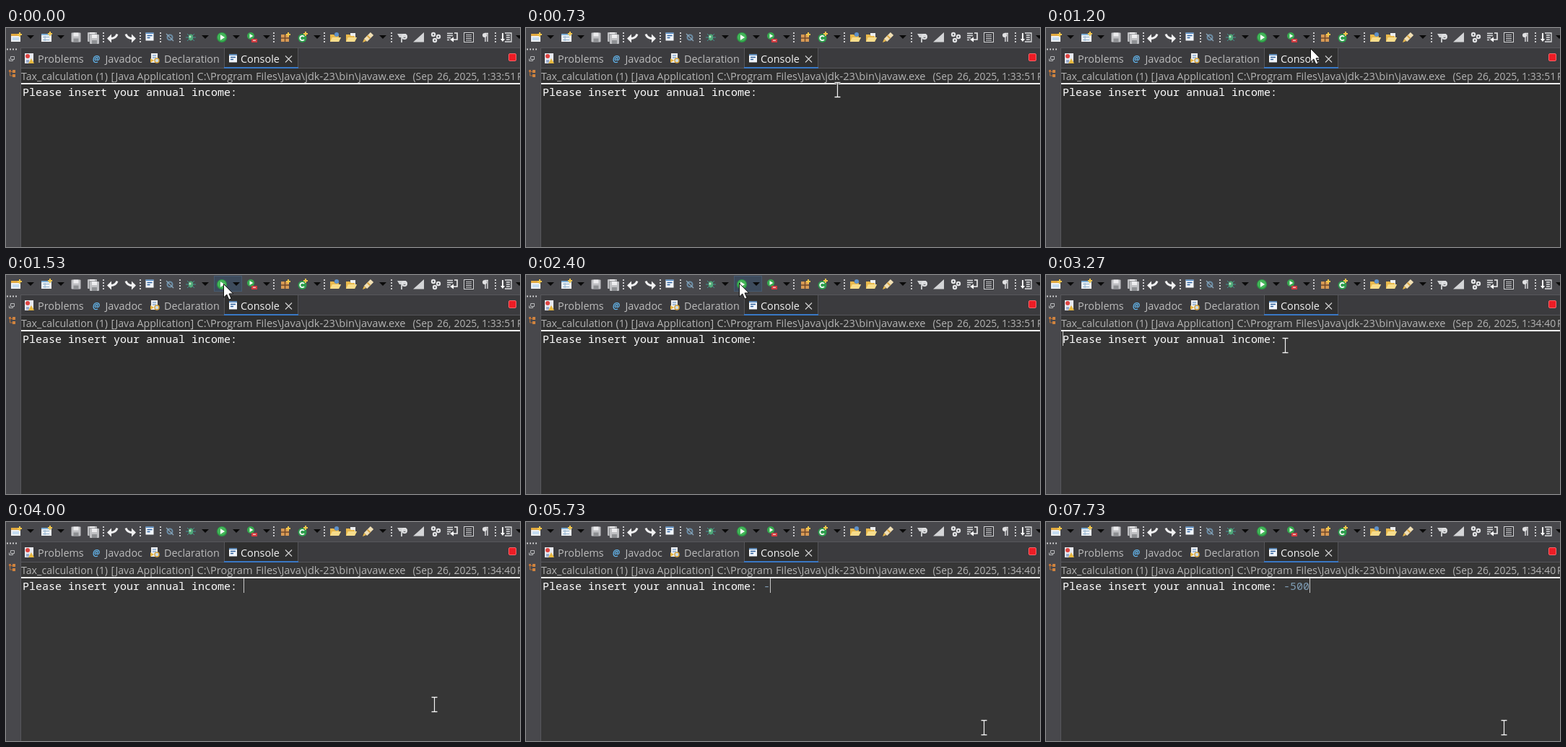
Write an HTML page that moves like this. It is 712x303 px and loops after 8 s.

```html
<!DOCTYPE html>
<html lang="en">
<head>
<meta charset="utf-8">
<title>Console input</title>
<style>
  html, body { margin: 0; width: 100%; height: 100%; overflow: hidden; background: #48484c; }
  svg { display: block; width: 712px; height: 303px; }
  text { white-space: pre; }
  .ui { font: 14.4px "Open Sans", "Noto Sans", sans-serif; fill: #bcbcbc; }
  .head { font-size: 14.2px; fill: #b4b4b4; }
  .file { font-size: 14.6px; fill: #b4b4b4; }
  .date { font-size: 13.9px; fill: #b4b4b4; }
  .mono { font: 15px "Noto Sans Mono", "DejaVu Sans Mono", monospace; fill: #fff; }
</style>
</head>
<body>
<svg id="stage" viewBox="0 0 712 303" xmlns="http://www.w3.org/2000/svg"></svg>
<script>
const LOOP = 8000;
const stage = document.getElementById('stage');

const rect = (x, y, w, h, fill, more = '') =>
  `<rect x="${x}" y="${y}" width="${w}" height="${h}" fill="${fill}" ${more}/>`;
const path = (d, fill, stroke = 'none', width = 1) =>
  `<path d="${d}" fill="${fill}" stroke="${stroke}" stroke-width="${width}"/>`;
const line = (d, color, width = 1) => path(d, 'none', color, width);
const dots = d => `<path d="${d}" stroke="#c9c9cb" stroke-width="2" stroke-dasharray="2 2"/>`;
const disc = (x, y, r, fill) => `<circle cx="${x}" cy="${y}" r="${r}" fill="${fill}"/>`;
const ring = (x, y, r, color, width) =>
  `<circle cx="${x}" cy="${y}" r="${r}" fill="none" stroke="${color}" stroke-width="${width}"/>`;
const text = (x, y, value, cls = 'ui', more = '') =>
  `<text x="${x}" y="${y}" class="${cls}" ${more}>${value}</text>`;
const at = (x, y, body) => `<g transform="translate(${x} ${y})">${body}</g>`;

// Toolbar icons are drawn around their own centre.
const plus = (x, y) => line(`M${x - 3} ${y}h6M${x} ${y - 3}v6`, '#f3c64b', 2);
const play = (x, y, s) => path(`M${x} ${y - s}l${s * 1.6} ${s}l${-s * 1.6} ${s}z`, '#fff');
const floppy = (x, y) => rect(x, y, 13, 13, '#bfc0c3', 'rx="1"') +
  rect(x + 3, y, 7, 5, '#ececee') + rect(x + 3, y + 8, 7, 5, '#8e9093');
const monitor = rect(-5.5, -5.5, 11, 11, '#f1f5fa') + rect(-5.5, -5.5, 11, 1.5, '#4a86c5') +
  line('M-3.5 -1.5h7M-3.5 1.5h4', '#2e5f9b', 1.3);
const folder = path('M-7 6V-4h5l2 2h5v2h3l-3 6z', '#e9b94c') + path('M-7 6l3-6h12l-3 6z', '#f8dd8c');
const arrowBack = path('M-8 1.5l6-6v12z', '#f0f0f1') + line('M-3 1.5q7 0 9-6', '#f0f0f1', 3);
const node = (x, y) => disc(x, y, 3.2, '#e4e5e7') + disc(x, y, 1.2, '#66686c');

const icons = [
  [14, 13, rect(-7, -5, 13, 11, '#eef0f2') + rect(-7, -5, 13, 3, '#e2a93f') +
    rect(-5, 0, 9, 4, '#c5dcf0') + plus(5, -4)],
  [56, 13, rect(-7, -5, 14, 11, '#eef2f6') + rect(-7, -5, 14, 2, '#7fb0d8') +
    line('M-5 -.5h9M-5 3.5h9M-2 -2v7', '#8fb0cc') + plus(5, -5)],
  [97, 13, floppy(-6.5, -6.5)],
  [120, 13, floppy(-7, -7) + rect(-4.5, -4.5, 12, 12, '#55565a') + floppy(-4, -4)],
  [148, 13, arrowBack],
  [172, 13, `<g transform="scale(-1 1)">${arrowBack}</g>`],
  [199, 12, monitor],
  [227, 13, ring(0, 0, 3.5, '#6b8da6', 2) + line('M-5 -5L5 5', '#8ba6b9', 1.3)],
  [256, 13, line('M-5 -5L5 5M5 -5L-5 5M-7 0H7', '#3f9290') + `<ellipse rx="3.2" ry="4.4" fill="#4fa878"/>` +
    disc(-1, -1, 1.5, '#c0e7c4')],
  [299, 13, disc(0, 0, 7, '#2b9b45') + disc(0, -.5, 5.8, '#45b55a') + play(-2, 0, 3.8)],
  [341, 13, disc(-2, -2, 5, '#37aa4f') + play(-3.5, -2, 3) + rect(-1, 2, 8, 5, '#d13a40') +
    rect(1, 3.5, 4, 1.5, '#f5c0bb')],
  [387, 13, rect(-6, -4, 11, 10, '#d89a55') + line('M-.5 -4v10M-6 1h11', '#714a2a', 1.5) + plus(4, -4)],
  [411, 13, disc(-.5, 1, 6, '#2e9d4d') + line('M2 -1a3.2 3.2 0 1 0 0 4', '#fff', 1.8) + plus(4, -5)],
  [456, 13, folder + disc(2, -4, 3, '#5f91c9')],
  [478, 13, rect(-1, -6, 7, 6, '#eef0f2') + folder],
  [502, 13, line('M-4 4L5 -5', '#f0dfb5', 6) + line('M-1.5 -2.5l4 4', '#d9a747', 2) +
    path('M-8 7l2-5 3 3z', '#e9b94c')],
  [549, 13, path('M-7 -5H5V0H-4z', '#d2d3d5') + ring(3, -1, 3, '#e2e3e5', 2) + line('M-1 0v7', '#c6c8ca', 2)],
  [572, 13, path('M-8 6.5L7 -7v13.5z', '#d4d5d7')],
  [595, 13, node(-3, -4) + node(4, -1) + node(-1, 4)],
  [618, 13, line('M-7 -5.5h8M-7 -2.5h8M-7 .5h5M-7 3.5h3', '#dcdddf', 1.5) +
    line('M3 -6h4V3H1', '#eee', 1.6) + path('M2 -.5v7L-3 3z', '#fff')],
  [641, 13, rect(-6.5, -6.5, 13, 13, '#36363a', 'stroke="#d5d6d8"') +
    line('M-4 -3.5h8M-4 -1h8M-4 1.5h8M-4 4h8', '#d5d6d8')],
  [664, 13, line('M0 -6v12M3 -6v12M-1 -5.5h5', '#e2e2e4', 1.4) + disc(-1, -3, 3, '#e2e2e4')],
  [693, 13, line('M-2 -6H7V6H-2M0 -3h5M0 0h5M0 3h5', '#dcdddf', 1.3) + line('M-5 -6v8', '#fff', 2) +
    path('M-8 2h6l-3 4z', '#fff')]
];

const dropdowns = [34, 76, 276, 319, 361, 431, 522, 711];
const separators = [135, 186, 214, 241, 371, 441, 534, 678];

const toolbar = icons.map(icon => at(...icon)).join('') +
  dropdowns.map(x => path(`M${x - 5} 10h10l-5 5z`, '#0a0a0a')).join('') +
  separators.map(x => dots(`M${x} 6V20`)).join('');

const leftStrip = dots('M1 29.5H15') +
  line('M6.5 39.5h5v4h-5zM4.5 42.5v3h5v-2', '#b8b9bb') +
  rect(4, 58, 3, 3, '#c07238') + rect(9, 58, 4, 4, '#cf8440') + rect(9, 64, 4, 4, '#cf8440') +
  line('M5.5 60v6h4M5.5 60.5h4', '#b87035');

const tabIcons =
  at(32, 42, rect(-6, -7, 12, 14, '#e8eaf0') + disc(-2, -3, 3, '#dd4340') +
    line('M-4 3h4M-4 5h4', '#496fae') + path('M3 0l4 7H-1z', '#e8b940')) +
  text(120, 47, '@', 'ui', 'style="fill:#64b8f0;font-size:11.5px;font-weight:700;font-style:italic"') +
  at(206, 42, rect(-5, -7, 9, 13, '#eceef1') + line('M-3 -4h5M-3 -1h5', '#5687bd') +
    path('M-6 0l5 3-5 3z', '#e5b33f') + disc(3, 3, 3, '#c8dff3') + ring(3, 3, 3, '#d9a43b', 1.5)) +
  at(314.5, 42, monitor);

const tabs = text(44, 48, 'Problems') + text(137.5, 48, 'Javadoc') + text(219, 48, 'Declaration') +
  text(325, 48, 'Console', 'ui', 'style="fill:#f4f4f4"');

const words = (cls, list) => list.map(([x, word]) => text(x, 72, word, `ui ${cls}`)).join('');
const status =
  words('head', [[21, 'Tax_calculation'], [124.5, '(1)'], [145.5, '[Java'], [181.5, 'Application]']]) +
  words('file', [[264.5, 'C:\\Program'], [346, 'Files\\Java\\jdk-23\\bin\\javaw.exe']]) +
  words('date', [[563.5, '(Sep'], [597, '26,'], [620.5, '2025,'], [708, 'PM)']]) +
  text(659, 72, '', 'ui date', 'id="clock"');

const arrow = path('M.5 .5V19l4.3-4 3.1 7.2 3.2-1.4-3.1-6.9h5.7z', '#fff', '#111');
const busy = ring(18, 2, 6.5, '#1b6dc1', 4.5) + line('M18 -4.5a6.5 6.5 0 0 1 6.5 6.5', '#3286da', 3);
const beamShape = 'M-4 -10h3.5l.5 1 .5-1h3.5M-4 10h3.5l.5-1 .5 1h3.5M0 -9V9';
const iBeam = at(.5, .5, line(beamShape, '#222', 2.6) + line(beamShape, '#f4f4f4', 1.3));

const border = '#56565a';
stage.innerHTML =
  rect(0, 0, 712, 303, '#48484c') +
  rect(288.5, 1.5, 38, 21, '#3d4b5c', 'id="hover" stroke="#465a70"') + toolbar + leftStrip +
  rect(20, 27, 692, 276, border) + rect(21, 28, 691, 27, '#3b3b3e') +
  rect(21, 56, 691, 247, '#2f2f2f', 'id="panel"') + rect(302, 28, 103, 28, '#2f2f2f') +
  line('M302.5 28V55M404.5 28V55', border) + rect(302, 54, 103, 2, '#3a78c4') +
  tabIcons + tabs + line('M387 38.5l9 9M396 38.5l-9 9', '#d0d0d0', 1.2) +
  rect(696.5, 35.5, 10, 10, '#ee1c25', 'rx="1.5" stroke="#f2666a"') + status + rect(21, 76, 691, 2, '#f2f2f2') +
  text(23, 94, 'Please insert your annual income: ', 'mono', 'id="prompt"') +
  text(329, 94, '', 'mono', 'id="typed" style="fill:#7f9db5"') +
  rect(0, 78, 1, 20, '#c8c8c8', 'id="caret"') +
  `<g id="arrow">${arrow}<g id="busy">${busy}</g></g><g id="beam">${iBeam}</g>`;

const el = Object.fromEntries([...stage.querySelectorAll('[id]')].map(item => [item.id, item]));
const show = (item, visible) => item.setAttribute('visibility', visible ? 'inherit' : 'hidden');
const within = (t, from, to) => t >= from && t < to;

const easeOut = s => 1 - (1 - s) ** 2;
const linear = s => s;
// time, x, y, easing towards this point
const pointer = [
  [400, 694, 292], [867, 407, 67, easeOut], [1000, 407, 67],
  [1200, 366, 28, linear], [1667, 295, 11, easeOut], [3067, 295, 11],
  [3533, 348, 138, easeOut], [3800, 348, 138],
  [4000, 593, 252, linear], [4200, 634, 284, easeOut]
];
// from, to, x
const carets = [
  [2870, 3400, 23], [3730, 4200, 329], [4730, 5270, 329], [5670, 6200, 338],
  [6730, 6800, 338], [6800, 7270, 347], [7270, 7470, 356], [7470, LOOP, 365]
];
const keys = [5670, 6800, 7270, 7470];

function pointerAt(t) {
  const next = pointer.findIndex(p => p[0] > t);
  if (next < 1) return (next ? pointer.at(-1) : pointer[0]).slice(1, 3);
  const [t0, x0, y0] = pointer[next - 1];
  const [t1, x1, y1, ease = linear] = pointer[next];
  const k = ease((t - t0) / (t1 - t0));
  return [x0 + (x1 - x0) * k, y0 + (y1 - y0) * k].map(Math.round);
}

function render(t) {
  // The pointer is sampled fifteen times a second.
  const [x, y] = pointerAt(Math.floor(t * 0.015 + 0.1) / 0.015);
  const pointing = y < 77;
  const place = `translate(${x} ${y})`;
  el.arrow.setAttribute('transform', place);
  el.beam.setAttribute('transform', place);
  show(el.arrow, pointing && t >= 400);
  show(el.beam, !pointing && t >= 400 && !within(t, 5670, 5730) && !within(t, 6800, 7730));
  show(el.hover, y < 24 && within(x, 288, 327));
  el.busy.setAttribute('display', within(t, 2470, 3130) ? 'inline' : 'none');

  const restarted = t >= 2670;
  el.panel.setAttribute('fill', restarted ? '#363636' : '#2f2f2f');
  el.clock.textContent = restarted ? '1:34:40' : '1:33:51';
  show(el.prompt, !within(t, 2670, 2870));
  el.typed.textContent = '-500'.slice(0, keys.filter(k => t >= k).length);

  const caret = carets.find(([from, to]) => within(t, from, to));
  show(el.caret, caret);
  if (caret) el.caret.setAttribute('x', caret[2]);
}

const start = performance.now();
function tick() {
  render((performance.now() - start) % LOOP);
  requestAnimationFrame(tick);
}
tick();
</script>
</body>
</html>
```
